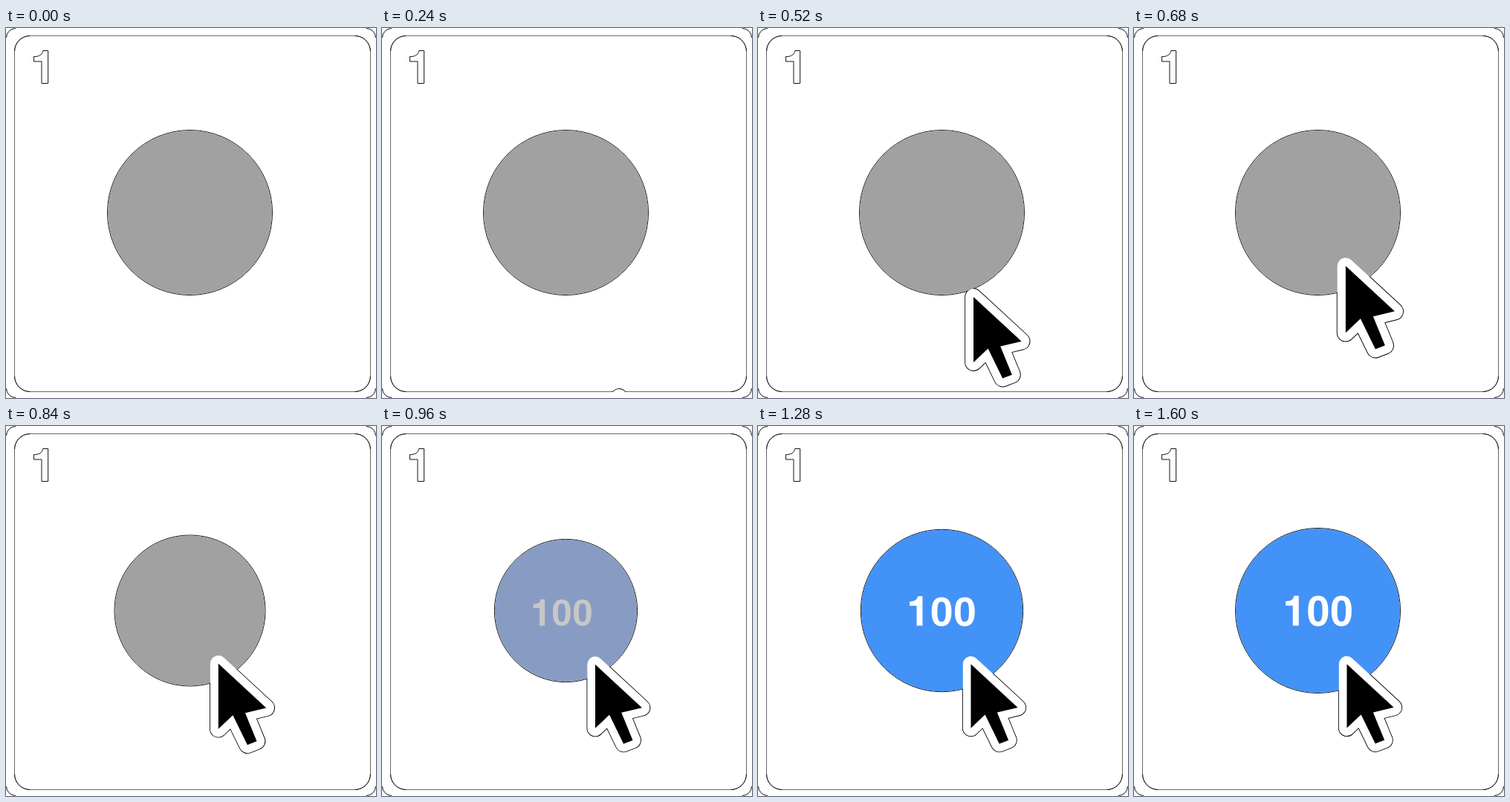
An HTML page for the animation above (2120 ms loop, 498x498 px).

```html
<!DOCTYPE html>
<html lang="en">
<head>
<meta charset="utf-8">
<title>Button press</title>
<style>
  html, body { margin: 0; width: 100%; height: 100%; overflow: hidden; background: #fff; }
  svg { display: block; width: 100vw; height: 100vh; }
  text { font: bold 57px "Liberation Sans", Arial, sans-serif; }
</style>
</head>
<body>
<svg viewBox="0 0 498 498">
  <defs>
    <path id="one" d="M378 0V-709H268C250 -615 180 -580 69 -580V-475H238V0Z"/>
    <path id="arrow" d="M0 0V90L20 71L40 112L53 107L37 68L66 61Z" stroke-linejoin="round"/>
    <clipPath id="card"><rect x="11" y="10" width="480" height="480" rx="22"/></clipPath>
  </defs>

  <g fill="none" stroke="#111">
    <rect x="11.5" y="10.5" width="479" height="479" rx="21" stroke="#6a6a6a"/>
    <path d="M11.5 31.5a21 21 0 0 1 21-21M469.500 10.5a21 21 0 0 1 21 21M490.500 468.500a21 21 0 0 1-21 21M32.500 489.500a21 21 0 0 1-21-21"/>
    <path d="M.5 13A12.500 12.500 0 0 1 13 .5M485 .5A12.500 12.500 0 0 1 497.500 13M497.500 485A12.500 12.500 0 0 1 485 497.500M13 497.500A12.500 12.500 0 0 1 .5 485"/>
  </g>
  <g transform="translate(33.2 74.5) scale(.062)" fill="#fff" stroke="#111" stroke-width="16">
    <use href="#one"/>
  </g>

  <g clip-path="url(#card)">
    <circle id="ring" cx="247.5" cy="248.5" fill="none" stroke="#111"/>
    <use class="cursor" href="#arrow" fill="#000" stroke="#000" stroke-width="24.2"/>
    <circle id="disc" cx="247.5" cy="248.5"/>
    <g id="label" role="img" aria-label="100">
      <use href="#one" transform="scale(.057)"/>
      <text x="31.7">00</text>
    </g>
    <g class="cursor">
      <use href="#arrow" fill="#fff" stroke="#fff" stroke-width="22.4"/>
      <use href="#arrow"/>
    </g>
  </g>
</svg>
<script>
const LOOP = 2120, STEP = 40, RADIUS = 111;
const GRAY = [161, 161, 161], BLUE = [67, 146, 247], WHITE = [255, 255, 255];

// [time, x, y, scale] once the pointer has arrived
const press = [
  [700, 284.8, 318.8, 1], [760, 285, 319, .988], [800, 285.4, 319.4, .983],
  [960, 287, 321, .953], [1080, 287.9, 322, .923], [1280, 286.5, 320.6, .956],
  [1360, 286.4, 320.4, .958], [1600, 286.5, 320.5, .956]
];
// [time, scale]
const bounce = [
  [770, 1], [910, .83], [960, .866], [1080, 1.037],
  [1240, .978], [1280, .984], [1320, 1]
];
const grow = [[400, .965], [680, 1]];
const tint = [[900, 0], [960, .35], [1060, 1]];

const $ = id => document.getElementById(id);
const cursors = document.querySelectorAll('.cursor');
const ring = $('ring'), disc = $('disc'), label = $('label');

// Monotone cubic through column c of the keys
function along(keys, t, c = 1) {
  const last = keys.length - 1;
  if (t <= keys[0][0]) return keys[0][c];
  if (t >= keys[last][0]) return keys[last][c];
  const i = keys.findIndex(k => k[0] > t) - 1;
  const slope = j => (keys[j + 1][c] - keys[j][c]) / (keys[j + 1][0] - keys[j][0]);
  const tangent = j => {
    if (j === 0 || j === last) return 0;
    const a = slope(j - 1), b = slope(j);
    return a * b <= 0 ? 0 : 2 * a * b / (a + b);
  };
  const h = keys[i + 1][0] - keys[i][0], u = (t - keys[i][0]) / h, v = 1 - u;
  return v * v * (1 + 2 * u) * keys[i][c] + u * u * (3 - 2 * u) * keys[i + 1][c]
    + h * u * v * (v * tangent(i) - u * tangent(i + 1));
}

// Blend in squared light
function mix(a, b, k) {
  return `rgb(${a.map((v, i) => Math.round(Math.sqrt(v * v + (b[i] ** 2 - v * v) * k)))})`;
}

function pointer(t) {
  if (t >= 700) return [1, 2, 3].map(c => along(press, t, c));
  const rest = (700 - t) / 460;
  return [284.8 + 34.3 * rest ** 2, 318.8 + 178 * rest ** 1.51, along(grow, t)];
}

function draw(t) {
  const size = along(bounce, t), k = along(tint, t);
  ring.setAttribute('r', RADIUS * size);
  disc.setAttribute('r', RADIUS * size - .5);
  disc.setAttribute('fill', mix(GRAY, BLUE, k));
  label.setAttribute('fill', mix(GRAY, WHITE, k));
  label.setAttribute('transform', `translate(200.2 268.8) scale(${1 + (size - 1) * .9})`);

  const [x, y, s] = pointer(t);
  for (const c of cursors) {
    c.setAttribute('visibility', t < 240 ? 'hidden' : 'visible');
    c.setAttribute('transform', `translate(${x} ${y}) scale(${s})`);
  }
}

const start = performance.now();
function tick() {
  const t = (performance.now() - start) % LOOP;
  draw(Math.floor(t / STEP) * STEP);
  requestAnimationFrame(tick);
}
tick();
</script>
</body>
</html>
```
